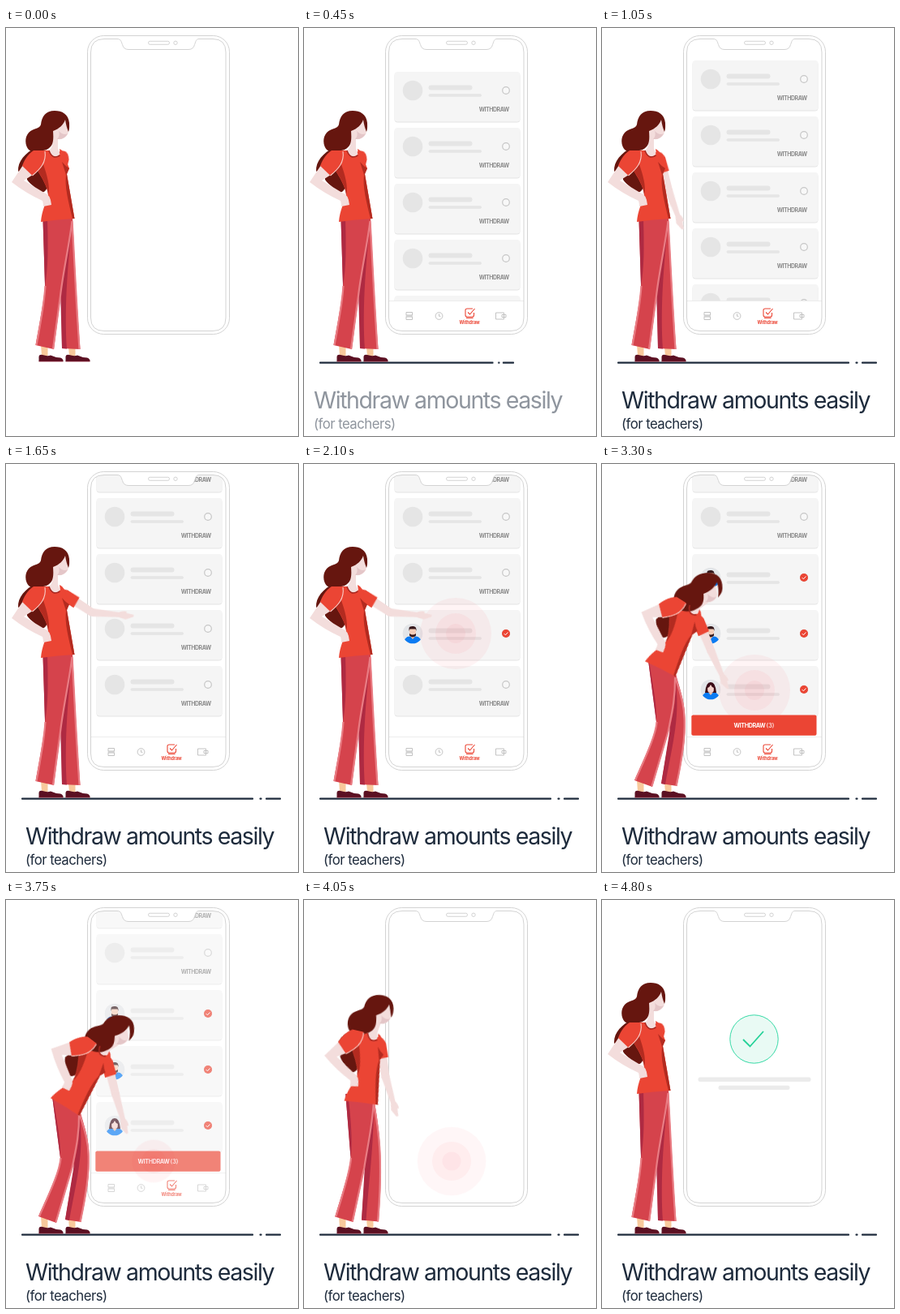
Recreate the animation shown at these times as an HTML page without scripts. Size 360 px wide and 503 px high, loop 5400 ms.

```html
<!DOCTYPE html>
<html lang="en">
<head>
<meta charset="utf-8">
<title>Withdraw amounts easily</title>
<style>
html, body { margin: 0; width: 100%; height: 100%; overflow: hidden; background: #fff }
svg { display: block; width: 100vw; height: 100vh }
text { font-family: Inter, "Open Sans", sans-serif; font-optical-sizing: none }
@property --on { syntax: "<number>"; inherits: true; initial-value: 0 }

/* one beat is 150 ms, 1/36 of the loop */
.a { animation: 5.4s steps(1) -10ms infinite }

/* caption and ground */
.ground { transform-origin: 19px 413px; animation-name: grow; animation-timing-function: steps(4) }
@keyframes grow { 0% { transform: scaleX(0) } 11.11%, 100% { transform: none } }
.caption { animation-name: enter; animation-timing-function: steps(4) }
@keyframes enter {
  0%, 2.78% { transform: translateX(-24px); opacity: 0 }
  13.89%, 100% { transform: none; opacity: 1 }
}

/* screen */
.screen { animation-name: screen; animation-timing-function: steps(3) }
@keyframes screen { 0%, 75%, 100% { opacity: 0 } 8.33%, 66.67% { opacity: 1 } }
.list { animation-name: scroll }
@keyframes scroll {
  0% { transform: translateY(60px) }
  2.78% { transform: translateY(45px) }
  5.56% { transform: translateY(28px) }
  8.33% { transform: translateY(14px) }
  11.11% { transform: translateY(5px) }
  13.89% { transform: none }
  22.22% { transform: translateY(-5px) }
  25% { transform: translateY(-24px) }
  27.78% { transform: translateY(-52px) }
  30.56%, 100% { transform: translateY(-67px) }
}
.pick { animation-timing-function: steps(2) }
.p1 { animation-name: pick1 }
.p2 { animation-name: pick2 }
.p3 { animation-name: pick3 }
@keyframes pick1 { 0%, 33.33% { --on: 0 } 38.89%, 100% { --on: 1 } }
@keyframes pick2 { 0%, 50% { --on: 0 } 55.56%, 100% { --on: 1 } }
@keyframes pick3 { 0%, 55.56% { --on: 0 } 61.11%, 100% { --on: 1 } }
.row { transform: translateY(calc(var(--on) * 6px)) }
.yes { opacity: var(--on) }
.no { opacity: calc(1 - var(--on)) }
.pay { transform: translateY(calc(30px - var(--on) * 30px)) }

.tap { opacity: 0; animation: tap 5.4s steps(1) calc(var(--t) - 10ms) infinite }
.core { animation: core 5.4s steps(1) calc(var(--t) - 10ms) infinite }
@keyframes tap {
  0% { transform: scale(.15); opacity: .5 }
  2.78% { transform: scale(.6); opacity: 1 }
  5.56% { transform: none; opacity: 1 }
  8.33% { transform: scale(.96); opacity: .85 }
  11.11%, 100% { opacity: 0 }
}
@keyframes core { 0% { opacity: 1 } 8.33%, 100% { opacity: 0 } }

/* success */
.ok { transform-origin: 187.5px 171.5px; animation-name: pop }
@keyframes pop {
  0% { opacity: 0 }
  83.33% { opacity: 1; transform: scale(.5) }
  86.11% { opacity: 1; transform: scale(1.33) }
  88.89%, 100% { opacity: 1; transform: none }
}
.tick { stroke-dasharray: 1 2; animation-name: tick }
@keyframes tick {
  0% { stroke-dashoffset: 1.1 }
  86.11% { stroke-dashoffset: .5 }
  88.89%, 100% { stroke-dashoffset: 0 }
}
.bars { transform-origin: 188px 226px; animation-name: bars }
@keyframes bars {
  0% { transform: scale(0) }
  83.33% { transform: scale(.5) }
  86.11% { transform: scale(1.03) }
  88.89%, 100% { transform: none }
}

/* woman */
.torso { transform-origin: 63.5px 237px; animation-name: torso }
@keyframes torso {
  0%, 50% { transform: none }
  52.78% { transform: translate(2px, 4px) rotate(7deg) }
  55.56% { transform: translate(5px, 11px) rotate(20deg) }
  58.33%, 63.89% { transform: translate(8px, 15.5px) rotate(32deg) }
  66.67%, 69.44% { transform: translate(9px, 18px) rotate(37deg) }
  72.22% { transform: translate(8px, 16px) rotate(26deg) }
  75% { transform: translate(6.5px, 13px) rotate(12.6deg) }
  77.78% { transform: translate(3px, 5px) rotate(5deg) }
  80.56%, 100% { transform: none }
}
.head, .neck, .hair { animation-timing-function: steps(3) }
.head { transform-origin: 60px 150px; animation-name: head }
@keyframes head {
  0%, 50%, 77.78%, 100% { transform: translateX(0) rotate(0deg) }
  58.33%, 69.44% { transform: translateX(11.5px) rotate(-30deg) }
}
.neck { transform-origin: 60px 153px; animation-name: neck }
@keyframes neck { 0%, 50%, 77.78%, 100% { transform: skewX(0deg) } 58.33%, 69.44% { transform: skewX(-22deg) } }
.hair { d: var(--s); animation-name: hair }
@keyframes hair { 0%, 50%, 77.78%, 100% { d: var(--s) } 58.33%, 69.44% { d: var(--b) } }
.leg { d: var(--s); animation-name: leg; animation-timing-function: steps(3) }
@keyframes leg {
  0%, 50%, 80.56%, 100% { d: var(--s) }
  58.33% { d: var(--b) }
  69.44% { d: var(--b); animation-timing-function: steps(4) }
}
.upper { animation-name: upper }
@keyframes upper {
  0% { transform: rotate(15deg) }
  13.89% { transform: rotate(5deg) }
  16.67% { transform: rotate(-5deg) }
  19.44% { transform: rotate(-14deg) }
  22.22% { transform: rotate(-27deg) }
  25% { transform: rotate(-40deg) }
  27.78% { transform: rotate(-50deg) }
  30.56% { transform: rotate(-56deg) }
  33.33% { transform: rotate(-59deg) }
  36.11% { transform: rotate(-57deg) }
  38.89% { transform: rotate(-56deg) }
  44.44% { transform: rotate(-62deg) }
  47.22% { transform: rotate(-70deg) }
  50% { transform: rotate(-76deg) }
  52.78% { transform: rotate(-74deg) }
  55.56% { transform: rotate(-66deg) }
  58.33% { transform: rotate(-53deg) }
  66.67% { transform: rotate(-50deg) }
  72.22% { transform: rotate(-38deg) }
  75% { transform: rotate(-20deg) }
  77.78% { transform: rotate(-5deg) }
  80.56%, 100% { transform: rotate(15deg) }
}
.fore { animation-name: fore }
@keyframes fore {
  0% { transform: rotate(-10deg) }
  13.89% { transform: rotate(-6deg) }
  22.22% { transform: rotate(-16deg) }
  25% { transform: rotate(-25deg) }
  27.78%, 38.89% { transform: rotate(-29deg) }
  44.44% { transform: rotate(-32deg) }
  50% { transform: rotate(-34.5deg) }
  55.56% { transform: rotate(-20deg) }
  58.33% { transform: rotate(-3deg) }
  75% { transform: rotate(-9deg) }
  80.56%, 100% { transform: rotate(-10deg) }
}
</style>
</head>
<body>
<svg viewBox="0 0 360 503">
<defs>
  <path id="glass" d="M121 13.5H137C142 13.5 142 17 143.500 20.500Q145 26.500 151 26.500H225Q231 26.500 232.500 20.500C234 17 234 13.500 238 13.500H255Q271 13.500 271 30V357Q271 373.500 255 373.500H121Q104.500 373.500 104.500 357V30Q104.500 13.500 121 13.500Z"/>
  <clipPath id="inside"><use href="#glass"/></clipPath>
  <clipPath id="above"><rect x="104" y="13" width="168" height="323"/></clipPath>
  <clipPath id="disc"><circle r="12.3"/></clipPath>

  <g id="panel">
    <rect x="111.500" y="1" width="155" height="61.500" rx="4" fill="#e4e4e4"/>
    <rect x="111.500" y="0" width="155" height="61.500" rx="4" fill="#f5f5f5"/>
  </g>
  <g id="info" fill="#e5e5e5">
    <circle cx="134" cy="23" r="12.300"/>
    <rect x="153.500" y="16.500" width="54" height="6" rx="3"/>
    <rect x="153.500" y="27.300" width="65.500" height="3.400" rx="1.700"/>
    <circle cx="249" cy="23" r="4.300" fill="#f8f8f8" stroke="#c6c6c6" stroke-width="1.200"/>
  </g>
  <text id="label" x="252.700" y="49" text-anchor="end" font-size="6.900" font-weight="700" letter-spacing="-.4" fill="#8a8a8a">WITHDRAW</text>
  <g id="card"><use href="#panel"/><use href="#info"/><use href="#label"/></g>
  <g id="checked">
    <circle cx="249" cy="23" r="5" fill="#eb4534"/>
    <path d="M246.700 23.100l1.700 1.700 3-3.300" fill="none" stroke="#fff"/>
  </g>

  <g id="shirt">
    <circle r="12.300" fill="#e3e5e8"/>
    <path d="M-12 13Q-10 3 -3 3.500H3Q10 3 12 13Z" fill="#0b7bf2"/>
    <path d="M-2.500 1H2.500V4L0 7L-2.500 4Z" fill="#f0c2aa"/>
  </g>
  <g id="man" clip-path="url(#disc)">
    <use href="#shirt"/>
    <rect x="-4" y="-7" width="8" height="11" rx="3.500" fill="#f4cdb8"/>
    <path d="M-4.500 -3V-6Q-5 -9 0 -9Q5 -9.500 4.500 -3L3.500 -5.500H-3.500ZM-4 0Q0 3 4 0V2.500Q0 6.500 -4 2.500Z" fill="#35191c"/>
  </g>
  <g id="lady" clip-path="url(#disc)">
    <path id="bob" d="M-7 4Q-6 -9 0 -9Q6 -9 7 4Z" fill="#3b0d18"/>
    <use href="#shirt"/>
    <use href="#bob"/>
    <rect x="-3.800" y="-6" width="7.600" height="10" rx="3.500" fill="#f4d2cc"/>
    <path d="M-4 -2Q-1 -3 0 -6Q1 -3 4 -2V-7H-4Z" fill="#3b0d18"/>
  </g>
  <g id="ripple" fill="#f04350">
    <circle r="44" opacity=".06"/>
    <g class="core"><circle r="25" opacity=".055"/><circle r="12" opacity=".05"/></g>
  </g>
</defs>

<!-- caption -->
<g class="a ground" stroke="#1e2b3c" stroke-width="2.200" stroke-linecap="round">
  <path d="M20 412.700H304M313.500 412.700H314.500M321 412.700H338"/>
</g>
<g class="a caption" fill="#1e2b3c">
  <text x="24" y="468.700" font-size="28.500" font-weight="400" letter-spacing="-1.400">Withdraw amounts easily</text>
  <text x="24" y="494" font-size="16.800" font-weight="400" letter-spacing="-.55">(for teachers)</text>
</g>

<!-- phone -->
<g class="a screen">
  <g clip-path="url(#inside)">
    <g clip-path="url(#above)">
      <g class="a list">
        <use href="#card" y="40"/>
        <use href="#card" y="109"/>
        <g transform="translate(0 178)"><g class="a pick p2">
          <use href="#panel"/>
          <g class="row"><use href="#info"/><g class="yes"><use href="#man" x="134" y="23"/><use href="#checked"/></g></g>
          <use href="#label" class="no"/>
        </g></g>
        <g transform="translate(0 247)"><g class="a pick p1">
          <use href="#panel"/>
          <g class="row"><use href="#info"/><g class="yes"><use href="#man" x="134" y="23"/><use href="#checked"/></g></g>
          <use href="#label" class="no"/>
        </g></g>
        <g transform="translate(0 316)"><g class="a pick p3">
          <use href="#panel"/>
          <g class="row"><use href="#info"/><g class="yes"><use href="#lady" x="134" y="23"/><use href="#checked"/></g></g>
          <use href="#label" class="no"/>
        </g></g>
      </g>
      <g transform="translate(187 209)"><use href="#ripple" class="tap" style="--t:1800ms"/></g>
      <g transform="translate(187 140)"><use href="#ripple" class="tap" style="--t:2700ms"/></g>
      <g transform="translate(188 279)"><use href="#ripple" class="tap" style="--t:3000ms"/></g>
      <g class="a pick p3"><g class="pay">
        <rect x="110.300" y="309.500" width="154.200" height="25.200" rx="2" fill="#eb4534"/>
        <text x="187.500" y="324.700" text-anchor="middle" font-size="7.200" font-weight="700" letter-spacing="-.4" fill="#fff">WITHDRAW <tspan font-weight="500" letter-spacing="0">(3)</tspan></text>
      </g></g>
    </g>
    <rect x="104" y="336" width="168" height="38" fill="#fff"/>
    <path d="M104 336.500H272" stroke="#ececec"/>
    <g fill="none" stroke="#bdbdbd" stroke-width=".9">
      <path d="M126 350.500H133.500V354H126ZM126 356H133.500V359.500H126ZM125.500 355H134"/>
      <circle cx="166.500" cy="355" r="4.400"/><path d="M166.500 352.300V355.300H168.500"/>
      <path d="M236.500 351H246.500V359H236.500ZM244 353.500H249V356.500H244Z"/>
    </g>
    <path d="M208 346H201Q199 346 199 348V354Q199 356 201 356H207.500Q209.500 356 209.500 354V351M202 350.500L204.500 353L210.500 346M200 357.500H208.500" fill="none" stroke="#eb4534" stroke-width="1.100"/>
    <text x="204" y="365" text-anchor="middle" font-size="5.500" font-weight="700" letter-spacing="-.15" fill="#eb4534">Withdraw</text>
  </g>
</g>
<g transform="translate(182 322)"><use href="#ripple" class="tap" style="--t:3600ms"/></g>

<g class="a ok">
  <circle cx="187.500" cy="171.500" r="29.700" fill="#e9faf4" stroke="#35d9a5"/>
  <path class="a tick" pathLength="1" d="M174 172L182.500 180.500L199 162" fill="none" stroke="#25d298" stroke-width="1.800"/>
</g>
<g class="a bars" fill="#ebebeb">
  <rect x="118.500" y="218.500" width="139" height="5.500" rx="2.500"/>
  <rect x="143.500" y="228.700" width="88" height="5.300" rx="2.500"/>
</g>

<g fill="none" stroke="#cfcfcf" stroke-width=".9">
  <rect x="100.500" y="9.500" width="175" height="368" rx="20"/>
  <use href="#glass"/>
  <rect x="175.500" y="16.300" width="26" height="4" rx="2"/>
  <circle cx="209" cy="18.300" r="2.200"/>
</g>

<!-- woman -->
<g class="a torso"><g transform="translate(72 160)"><g class="a upper">
  <path d="M-6 10H5L5 42Q0 46 -5 42Z" fill="#f3dddc"/>
  <g transform="translate(0 41)"><g class="a fore">
    <path d="M-5 0Q0 -5 5 0L3 33Q6 38 4.500 43L3 42L1.500 51.500L-1 51.500L-5 42L-3 33Z" fill="#f3dddc"/>
  </g></g>
  <path d="M-8 -6Q2 -12 6 1L6.500 18L-8 19Z" fill="#eb4534"/>
</g></g></g>

<g>
  <path d="M43 390H51.500V404H44ZM77 393H85.500V405H78Z" fill="#f8c99c"/>
  <path id="shoe" d="M40.500 411V405Q41 402 45 403Q51 405 55 403.500Q60 406 67 406.500Q71 408 70.500 411Z" fill="#5b1022"/>
  <use href="#shoe" x="33"/>
  <path d="M40.500 411H70.500M73.500 411H103.500" stroke="#8c2236" stroke-width=".8"/>
  <path class="a leg" fill="#d5434c" style="--s:path('M62 236L82 234C84 270 86 320 91.500 396L69 395L68 322Z');--b:path('M68 246L91 259C101 295 111 312 92.500 397L73 394L84 330Z')"/>
  <path class="a leg" fill="#ae2a42" style="--s:path('M82 237C79 270 69 300 67 322L69 395L75 395.500C72 350 75 300 82 237Z');--b:path('M90 262C92 300 86 310 83 332L73 394L78 395C88 340 97 310 90 262Z')"/>
  <path class="a leg" fill="#d5434c" style="--s:path('M45.500 236L82 234C78 270 71 300 67.500 330L59 396L36.500 391C42 360 48 330 48 315Z');--b:path('M57 242L91 259C91 290 86 310 82 330L62 398L40 390C51 365 66 335 67 318Z')"/>
  <path class="a leg" fill="#ae2a42" style="--s:path('M45.500 236L51 236C52 270 52 295 48 318Z');--b:path('M57 242L58 243C64 280 68 300 67 318Z')"/>
  <path class="a leg" fill="none" stroke="#e97c83" stroke-width="2.200" style="--s:path('M81.500 238C77.500 270 70.500 300 67 330L58 396M48.500 318C47.500 335 43 362 37.500 391M81.500 238C83.500 270 85.500 320 90.500 396');--b:path('M90 263C90.500 290 85.500 310 81.500 330L61.500 397M67.500 318C66.500 335 52 365 41 390M90.500 263C100 295 110 312 91.500 397')"/>
</g>

<g class="a torso">
  <path class="a hair" fill="#66160f" style="--s:path('M37 147C24 154 14 164 15 177C22 173 26 177 26 187C30 194 38 195 37 202C46 205 52 201 51 190L56 160Z');--b:path('M40 154C36 158 30 164 30 174C30 176 29 180 27 188C30 194 36 197 38 203C46 205 52 201 51 190L56 160Z')"/>
  <path class="a neck" d="M57.500 134L64 136V148L66.500 156Q59 163 53 151Q58 147 57.500 138Z" fill="#f3dddc"/>
  <path d="M33 152Q44 150 53 151Q58 163 67 156L66 149Q73 152 74 163L78 173L75 180L84.500 235Q64 236 43 239C44 225 50 214 52 205C51 196 44 184 39 176Z" fill="#eb4534"/>
  <path d="M39 176L46 168C50 180 55 195 52 206C51 196 46 186 39 176ZM69 165Q73 170 78 173L75 180L84.500 235L82 235C77 215 72 195 74 181Z" fill="#b32b20"/>
  <path d="M21 169L7 190Q25 204 45 213Q46 216 46 220L56 218Q55 205 47 203L22 188L33 181Z" fill="#f3dddc"/>
  <g class="a head">
    <path d="M57 124L73 112L77 127C77 133 71 138 64 137L58 141Z" fill="#f3dddc"/>
    <path d="M63 137Q67 133 65 127Q71 133 76 130Q72 138 63 137Z" fill="#e4c6c8"/>
    <path class="a hair" fill="#66160f" style="--s:path('M78 117C77 106 69 102 60 102C49 102 44 109 43 119C41 125 34 123 28 129C22 136 24 146 28 150C32 154 44 152 50 150C58 146 59 140 58 127C66 124 71 119 73 113C74 119 75 123 77 128C78.500 124 78 120 78 117Z');--b:path('M83 119C83 107 76 101 66 101C54 101 48 106 44 114C40 118 34 117 28 123C21 130 23 144 28 147C34 150 46 151 52 146C60 142 61 136 60 127C68 124 74 118 76 112C78 118 79 124 78 131C82 126 83 124 83 119Z')"/>
  </g>
  <path d="M53 151Q57 163 66.500 157" fill="none" stroke="#a82a22" stroke-width="1.500"/>
  <path d="M34 151C26 156 22 164 20 170L32.500 182C42 174 50 166 48 151Z" fill="#eb4534"/>
  <path d="M48 152C50 166 42 174 32.500 182" fill="none" stroke="#f8cfc9" stroke-width="1.100"/>
</g>
</svg>
</body>
</html>
```
